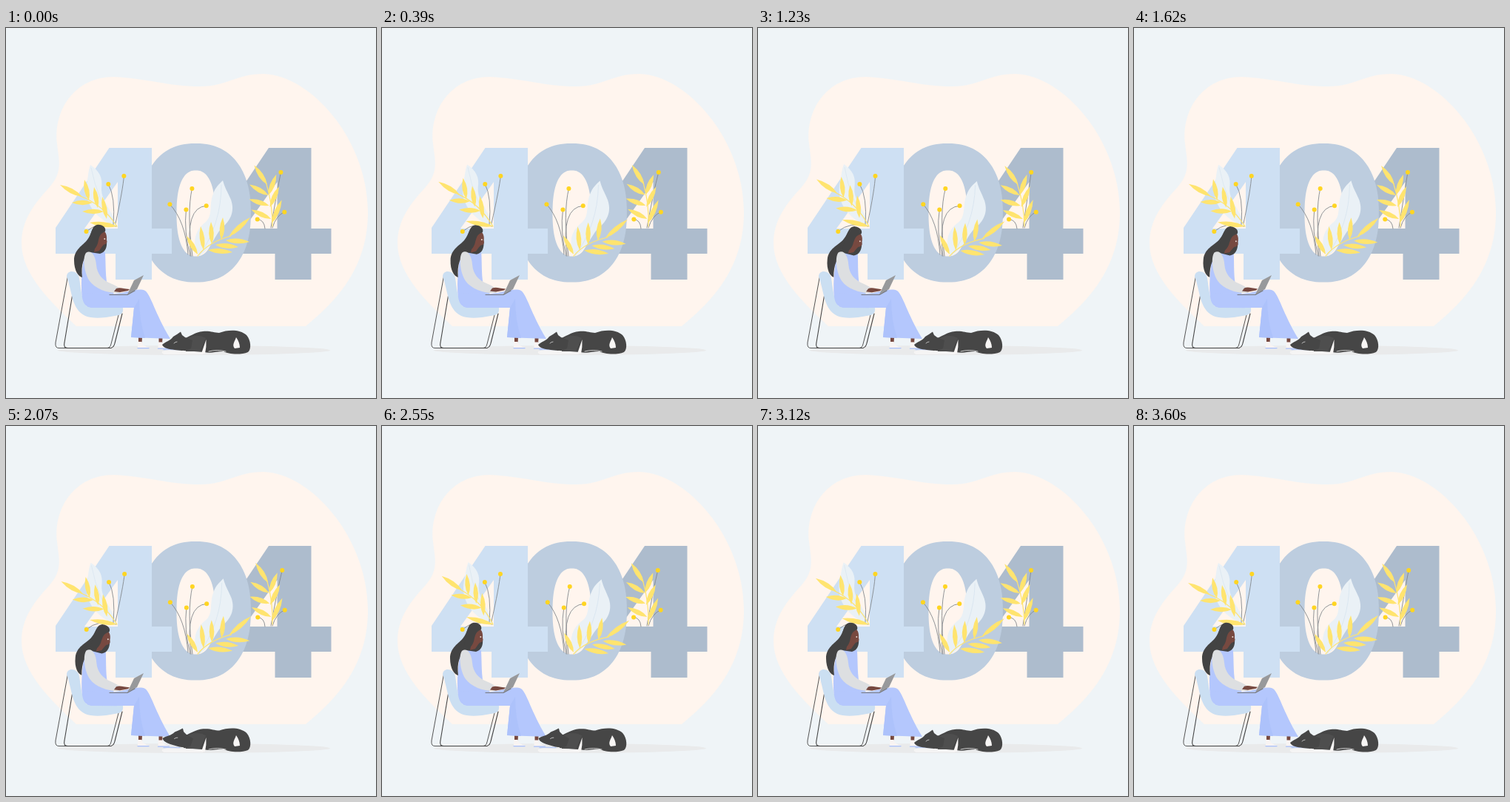
These frames come from a looping animation (500x500 px, 3.63 s). An HTML page with a canvas:

```html
<!DOCTYPE html>
<html lang="en">
<head>
<meta charset="utf-8">
<title>404</title>
<style>
html, body { margin: 0; width: 100%; height: 100%; overflow: hidden; background: #eff4f7; }
canvas { display: block; width: 500px; height: 500px; }
</style>
</head>
<body>
<canvas id="stage" width="500" height="500"></canvas>
<script>
const ctx = document.getElementById('stage').getContext('2d');
const LOOP = 3630;
const TAU = Math.PI * 2;
const YELLOW = '#ffe46f', DOT = '#ffd522', STEM = '#84898e', PALE = '#eaf1f6';
const HAIR = '#434343', SKIN = '#774940', DRESS = '#b4c7fd', SLEEVE = '#dddfe1', FUR = '#464646';

function fill(d, color, rule) {
  ctx.fillStyle = color;
  ctx.fill(new Path2D(d), rule || 'nonzero');
}

function line(d, color, width) {
  ctx.strokeStyle = color;
  ctx.lineWidth = width;
  ctx.stroke(new Path2D(d));
}

function ellipse(x, y, rx, ry, color) {
  ctx.fillStyle = color;
  ctx.beginPath();
  ctx.ellipse(x, y, rx, ry, 0, 0, TAU);
  ctx.fill();
}

// Draws around a pivot turned by an angle in degrees.
function turned(x, y, degrees, draw) {
  ctx.save();
  ctx.translate(x, y);
  ctx.rotate(degrees * TAU / 360);
  ctx.translate(-x, -y);
  draw();
  ctx.restore();
}

function superellipse(cx, cy, rx, ry, n) {
  const bend = v => Math.sign(v) * Math.abs(v) ** (2 / n);
  let d = '';
  for (let i = 0; i < 120; i++) {
    const a = i / 120 * TAU;
    d += (i ? 'L' : 'M') + (cx + rx * bend(Math.cos(a))) + ' ' + (cy + ry * bend(Math.sin(a)));
  }
  return d + 'Z';
}

function leaf(x1, y1, x2, y2) {
  const dx = x2 - x1, dy = y2 - y1, len = Math.hypot(dx, dy);
  const nx = -dy / len * 6.6, ny = dx / len * 6.6;
  const mx = x1 + dx * 0.46, my = y1 + dy * 0.46;
  fill(`M${x1} ${y1}Q${mx + nx} ${my + ny} ${x2} ${y2}Q${mx - nx} ${my - ny} ${x1} ${y1}Z`, YELLOW);
}

function branch(stem, leaves) {
  line(stem, YELLOW, 1.2);
  leaves.forEach(l => leaf(...l));
}

function berry(x, y, cx, cy, bx, by, dx) {
  line(`M${bx} ${by}Q${cx + dx * 0.3} ${cy} ${x + dx} ${y}`, STEM, 0.9);
  ellipse(x + dx, y, 3, 3, DOT);
}

const FOUR = 'M139.500 162H197V271H224V305H197V340H148V305H67V270ZM151 208L106 271H151Z';
const ZERO = superellipse(256.2, 249.8, 74.7, 93.8, 2.3) + superellipse(256.5, 250.5, 26, 58, 2.4);

function scenery() {
  ctx.fillStyle = '#eff4f7';
  ctx.fillRect(0, 0, 500, 500);
  fill('M95 403C62 372 21 333 21 291C21 258 40 236 58 216C78 194 71 178 69 156C64 112 92 66 146 66C190 68 220 79 262 79C300 79 310 62 348 62C412 64 488 150 489 247C490 322 448 368 405 403Z', '#fff5ee');
  ellipse(254, 435.5, 184, 6.5, '#e9eaeb');
  ctx.save();
  ctx.translate(215.5, 0);
  fill(FOUR, '#adbccd', 'evenodd');
  ctx.restore();
  fill(ZERO, '#bdcddf', 'evenodd');
  fill(FOUR, '#cee0f3', 'evenodd');
}

function leftPlant(sway, lag) {
  turned(150, 268, 2 * sway, () => {
    fill('M150 269C122 258 105 238 109 211C111 202 111 193 114 185C126 193 131 202 129 216C128 235 145 246 150 269Z', PALE);
    line('M149 267Q124 235 115 189', '#d7e4ef', 0.7);
  });
  berry(138, 211, 148, 228, 145, 266, lag + 0.3);
  berry(159.2, 200, 158, 218, 148, 264, lag + 0.2);
  berry(108.5, 275, 124, 261, 149, 268, lag * 0.3);
  turned(150, 268, 8 * sway, () => branch('M150 268Q130 238 100 227', [
    [103, 228, 73, 212], [112, 233, 106, 205], [124, 243, 119, 215], [136, 258, 130, 228],
    [117, 236, 89, 236], [132, 248, 103, 248], [150, 268, 113, 263]
  ]));
}

function centrePlant(sway) {
  turned(262, 308, 2.2 * sway, () => {
    fill('M261 308C248 285 260 270 270 262C280 253 274 238 280 224C283 215 288 211 293 206C296 217 299 220 304 232C310 249 302 261 293 269C282 279 279 297 261 308Z', PALE);
    line('M261 308Q291 265 291 212', '#d4e2ee', 0.7);
  });
  const dx = 2.6 * sway + 0.4;
  berry(221, 238.3, 242, 260, 246, 306, dx);
  berry(243, 245.5, 240, 275, 249, 308, dx);
  berry(251, 217, 244, 250, 252, 308, dx);
  berry(270.3, 240.3, 241, 242, 250, 308, dx);
  turned(258, 306, 5.6 * sway, () => branch('M259 308Q274 289 304 281', [
    [301, 282, 330, 256], [259, 306, 244, 281], [267, 300, 263, 268], [278, 292, 277, 262],
    [291, 286, 293, 256], [297, 287, 329, 289], [283, 293, 314, 296], [273, 300, 306, 303]
  ]));
}

function rightPlant(lag) {
  berry(371.4, 195, 366, 222, 358, 270, lag * 2.4);
  berry(376.3, 248.7, 365, 253, 360, 270, lag * 0.6);
  berry(339.7, 258.5, 349, 259, 350, 271, lag * 0.7);
  turned(360, 268, 1 + 1.6 * lag, () => branch('M360 268Q360 238 350 208', [
    [352, 212, 334, 186], [354, 226, 328, 212], [355, 240, 328, 232], [358, 258, 331, 246],
    [354, 226, 364, 198], [356, 242, 368, 214], [359, 264, 372, 232]
  ]));
}

function chair() {
  line('M84 333L67 425Q66 433 72 432.500H137Q141 432 142 427L152 388', '#555', 1);
  line('M90 359L79 425Q77 433 84 432.500H142Q146 431 147 426L157 386', '#454545', 1.1);
  fill('M82 336C82 326 97 327 99 338C101 350 102 368 109 376L158 378C159 386 155 388 147 389C133 392 116 393 107 389C88 380 89 353 82 336Z', '#cbdff2');
}

function foot(x, y) {
  ctx.save();
  ctx.translate(x, y);
  fill('M0 -14H5L4.500 -6H0Z', SKIN);
  fill('M-.8 -8H4.500L6 -4Q10 -1 15 0H-1Z', '#f8f4f3');
  line('M-1 .6H14', '#a9c0fa', 1.3);
  ctx.restore();
}

function head() {
  fill('M124 266C116 268 115 280 110 286C104 294 92 299 92 314C92 328 98 336 103 337C101 320 105 309 113 303L127 305C134 303 137 297 136 287L132 272Z', HAIR);
  fill('M125 274C133 271 137 278 136 286L136.500 289L135 292C131 292 129 297 126 301L119 303L122 286Z', SKIN);
  fill('M123 266C130 265 136 270 134 275C126 278 126 283 124 291C121 300 116 302 110 303L113 286C115 275 117 267 123 266Z', HAIR);
  ellipse(133.3, 285, 1, 1, '#e7d8d2');
}

function woman(nod, typing) {
  foot(179, 432);
  foot(206.5, 432.5);
  line('M213 434.500H235', '#b7caf6', 1.4);
  turned(122, 375, 0.6 * nod, () => {
    fill('M119 297H128V308H118Z', SKIN);
    fill('M111 300C104 307 102 330 102 350C102 370 106 378 118 378H150L145 357L138 352C134 338 135 320 134 304L131 299L126 303L118 302Z', DRESS);
  });
  turned(105, 330, 6 * nod, head);
  fill('M103 358L136 359C152 362 178 349 188 355C196 361 201 385 222 420L169 418L173 378H118C106 378 103 369 103 358Z', DRESS);
  fill('M173 378L180 366Q180 395 188 419L169 418Z', '#adc2fb');
  turned(154, 355, 0.5 * nod, () =>
    fill('M108 304C115 299 121 307 122 320C123 333 131 341 141 345Q151 349 156 354L154 358C139 359 121 353 113 342C106 332 103 311 108 304Z', SLEEVE));
  const y = 354 + typing * 0.6;
  fill(`M149 ${y - 2}C154 ${y - 4} 158 ${y - 2} 167 ${y - 1}L165 ${y + 1}L154 ${y + 3}L146 ${y + 2}Z`, SKIN);
  fill('M164 360L173 341L186 334L177 353Z', '#98999b');
  line('M140 360.500H164L174 355', '#77787b', 1.2);
}

function dog(lift) {
  fill('M211 437C218 433 234 437 246 436L268 438L266 441H214Q210 440 211 437Z', '#f5f4f4');
  turned(330, 440, 0.6 * lift, () => {
    fill('M238 421C248 417 256 411 266 410C276 409 281 412 288 412C300 407.500 316 407 325 415C331 422 332 434 327 438C318 442 300 441 294 437C285 437 276 440 268 438L240 436Z', FUR);
    fill('M244 420Q258 412 270 419L262 437H243Z', '#4e4e4e');
  });
  turned(250, 428, 9 * lift, () => {
    fill('M211 428C215 424 222 423 226 417L231 414L236 410.500L238 415L242 418L252 422L250 433C243 437 235 436 228 435C221 434 213 433 211 428Z', FUR);
    line('M227 426Q229 424 231 424', '#d8d8d8', 0.8);
  });
  fill('M270.500 421Q267 431 264 440H269Q271 431 270.500 421Z', '#f8f6f5');
  fill('M311 418C309 424 305 428 309 433L316 432C316 427 314 422 311 418Z', '#f8f6f5');
  line('M274 437Q285 434 297 437', '#efefef', 0.8);
}

// Eased switch from 0 to 1 and back, centred on a time in the loop.
function hold(t, centre, low, high) {
  const wave = Math.cos((t - centre) / LOOP * TAU);
  const u = Math.min(1, Math.max(0, (wave - low) / (high - low)));
  return u * u * (3 - 2 * u);
}

function draw(now) {
  const t = now % LOOP;
  const phase = t / LOOP * TAU * 2;
  const sway = (1 - Math.cos(phase)) / 2;
  const lag = Math.sin(phase);
  scenery();
  leftPlant(sway, lag);
  centrePlant(sway);
  rightPlant(lag);
  chair();
  woman(hold(t, 1360, -0.4, 0.35), Math.sin(phase * 3));
  dog(hold(t, 2320, 0.35, 0.9));
}

ctx.lineCap = ctx.lineJoin = 'round';
const start = performance.now();
function tick() {
  draw(performance.now() - start);
  requestAnimationFrame(tick);
}
tick();
</script>
</body>
</html>
```
